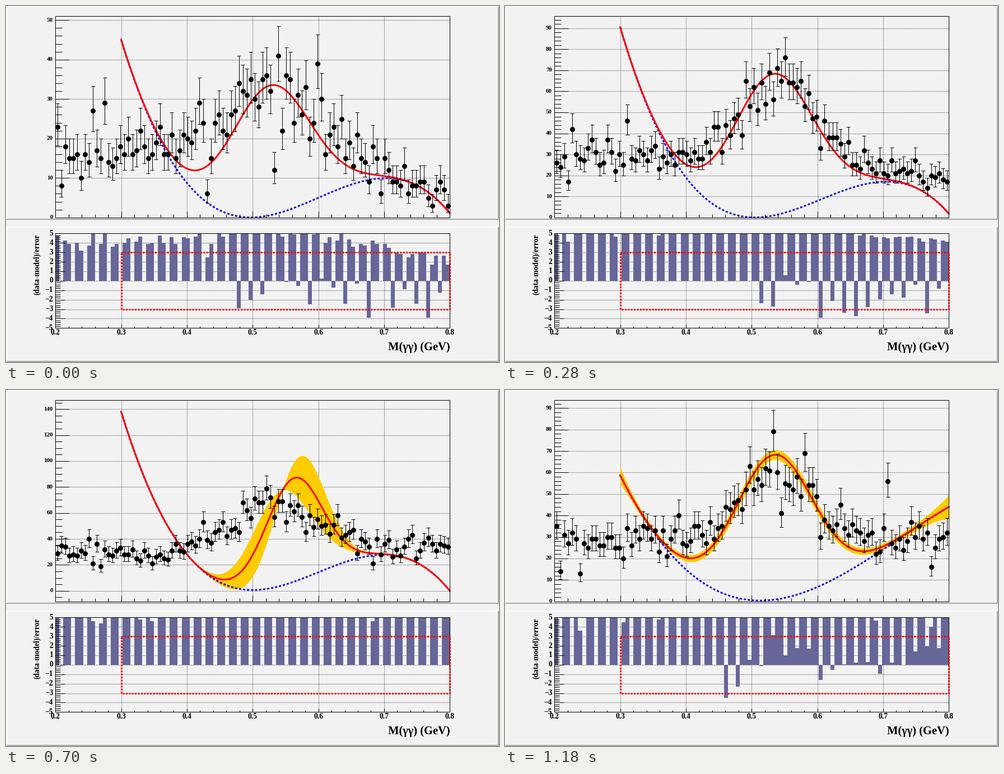
These frames come from a looping animation (880 by 636 pixels, 1.3 s). A matplotlib script:

```python
import matplotlib.pyplot as plt
import numpy as np
from matplotlib.animation import ArtistAnimation

W, H, DPI = 880, 636, 100
PX = 72 / DPI
plt.rcParams["font.family"] = "Liberation Serif"
plt.rcParams["font.weight"] = "bold"

LEFT, RIGHT = 88, 792
TOP, BOTTOM = 18, 378          # spectrum panel
PULL_TOP, PULL_BOTTOM = 406, 575
PULL_ZERO, PULL_UNIT = 490.6, 16.9
BINS = np.arange(100)
BIN = (RIGHT - LEFT) / 100
CENTERS = LEFT + BIN * (BINS + 0.5)
MASS = np.linspace(0.3, 0.8, 240)

fig = plt.figure(figsize=(W / DPI, H / DPI), dpi=DPI, facecolor="#f2f2f2")
ax = fig.add_axes([0, 0, 1, 1])
# the small shift keeps snapped lines on their own pixel
ax.set_xlim(-0.25, W - 0.25)
ax.set_ylim(H - 0.25, -0.25)
ax.axis("off")


def mass_px(m):
    return LEFT + (m - 0.2) * (RIGHT - LEFT) / 0.6


def hline(y, x0, x1, z=1, w=1, color="black", **kw):
    return ax.hlines(y, x0, x1, colors=color, lw=w * PX, zorder=z, **kw)


def vline(x, y0, y1, z=1, w=1, color="black", **kw):
    return ax.vlines(x, y0, y1, colors=color, lw=w * PX, zorder=z, **kw)


def label(x, y, s, size, ha="right", **kw):
    return ax.text(x, y, s, fontsize=size * PX, ha=ha, va="center", zorder=8, **kw)


DOTS = {"linestyles": [(0, (1, 2))]}


def draw_pad(y0, y1):
    """Bevelled pad edge."""
    for y, color in ((y0, "white"), (y1, "#a6a6a6")):
        hline(y, 0, W - 1, 0, 2, color)
    vline(0.5, y0, y1, 0, 2, "white")
    vline(W - 1, y0, y1, 0, 2, "#a6a6a6")


def draw_frame(y0, y1, major, minor):
    for y in (y0, y1):
        hline(y, LEFT, RIGHT, 4)
    for x in (LEFT, RIGHT):
        vline(x, y0, y1, 4)
    for k in range(31):
        x = mass_px(0.2 + 0.02 * k)
        vline(x, y1 - (minor if k % 5 else major), y1, 4)
        if k % 5 == 0 and 0 < k < 30:
            vline(x, y0, y1, 0.5, **DOTS)


def draw_static():
    draw_pad(0.5, 380.5)
    draw_pad(394.5, 634.5)
    draw_frame(TOP, BOTTOM, 11, 6)
    draw_frame(PULL_TOP, PULL_BOTTOM, 6, 3)
    for k in range(-25, 26):
        y = PULL_ZERO - PULL_UNIT * k / 5
        hline(y, LEFT, LEFT + (9 if k % 5 else 17), 4)
        if k % 5 == 0:
            label(84, y, str(k // 5).replace("-", "\u2212"), 13.5)
            if abs(k) < 25:
                hline(y, LEFT, RIGHT, 0.5, **DOTS)
    for k in range(2, 9):
        label(mass_px(k / 10), 583.5, f"0.{k}", 13.5, "center")
    label(RIGHT, 609.5, "M(\u03b3\u03b3) (GeV)", 20.5)
    label(55, 461, "(data-model)/error", 13.5, "center", rotation=90)
    box_x = mass_px(np.array([0.3, 0.8, 0.8, 0.3, 0.3]))
    box_y = PULL_ZERO - PULL_UNIT * np.array([3, 3, -3, -3, 3])
    ax.plot(box_x, box_y, color="red", lw=3 * PX, ls=(0, (1, 0.8)), zorder=5,
            dash_capstyle="butt")


def spectrum(seed, level, height, center, width, drop, standouts):
    """Noisy counts on a plateau with one bump; standouts are {bin: count}."""
    trend = (level + height * np.exp(-((BINS - center) / width) ** 2 / 2)
             - drop * (BINS / 99) ** 4)
    noise = np.random.default_rng(seed).normal(0, 0.8, 100)
    counts = np.maximum(np.round(trend + noise * np.sqrt(trend)), 3)
    for i, count in standouts.items():
        counts[i] = count
    return counts


def cubic(left, right, center, floor):
    """Cubic with its minimum at center, fixed at both ends of the fit range."""
    u0, u1 = 0.3 - center, 0.8 - center
    l, r = (left - floor) / u0**2, (right - floor) / u1**2
    slope = (r - l) / (u1 - u0)
    u = MASS - center
    return u**2 * (l + slope * (u - u0)) + floor


def pulls(counts, start, level, decay):
    """Every third bin is compared with a falling model, the rest with zero."""
    model = np.where(BINS % 3 == 1, level * np.exp(-decay * (BINS - start)), 0)
    return (counts - model) / np.sqrt(counts)


def scene(n, zero, unit, step, minor, bkg, peak, fall, band=None):
    """Build all artists of one fit; unit is pixels per count."""
    def to_y(v):
        return zero - unit * np.asarray(v)

    out = []
    low = int(np.ceil((zero - BOTTOM - 0.6) / unit / minor))
    high = int((zero - TOP) / unit / minor)
    for k in range(low, high + 1):
        value = k * minor
        y = to_y(value)
        major = value % step == 0
        out.append(hline(y, LEFT, LEFT + (25 if major else 12), 4))
        if major:
            out.append(label(83.5, y, str(value), 11))
            out.append(hline(y, LEFT, RIGHT, 0.5, **DOTS))

    x = mass_px(MASS)
    amp, mean, sigma = peak
    t = (MASS - mean) / sigma
    signal = amp * np.exp(-t**2 / 2)
    base = cubic(*bkg)
    fit = base + signal
    if band:
        err = band(t, signal)
        out.append(ax.fill_between(x, to_y(fit - err), to_y(fit + err),
                                   color="#ffcc00", lw=0, zorder=2))
    out += ax.plot(x, to_y(base), color="blue", lw=3 * PX, ls=(0, (1.3, 1.1)),
                   dash_capstyle="butt", zorder=3)
    out += ax.plot(x, to_y(fit), color="red", lw=3 * PX, zorder=3.5)

    # Poisson intervals
    top = to_y(n + np.sqrt(n + 0.75) + 1)
    bottom = to_y(n - np.sqrt(n - 0.25))
    out.append(vline(CENTERS, top, bottom, 6))
    for y in (top, bottom):
        out.append(hline(y, CENTERS - 3.5, CENTERS + 3.5, 6))
    out += ax.plot(CENTERS, to_y(n), "o", color="black", ms=9 * PX, mew=0, zorder=7)

    p = pulls(n, *fall)
    shown = p > -5
    out += ax.bar(CENTERS[shown], -PULL_UNIT * np.minimum(p[shown], 5), BIN,
                  bottom=PULL_ZERO, color="#666699", lw=0, zorder=2)
    return out


def shifted_band(t, signal):
    return np.hypot(signal * (0.155 + 0.33 * t - 0.13 * t**2), 0.6)


def flared_band(t, signal):
    ends = 2.8 * np.exp((0.3 - MASS) / 0.015) + 4.4 * np.exp((MASS - 0.8) / 0.025)
    return 1.2 + ends + signal * (0.014 + 0.02 * np.abs(t))


draw_static()
first = scene(
    spectrum(3, 16.5, 18, 56, 11, 11,
             {12: 29, 36: 29, 38: 6, 55: 12, 56: 41, 66: 39, 82: 6, 99: 3}),
    377.5, 7.05, 10, 2, (45, 1.06, 0.497, 0),
    (32.9, 0.527, 0.0605), (49, 47, 0.0273))
rest = [
    scene(
        spectrum(5, 30, 33, 56, 9.5, 11,
                 {3: 17, 4: 42, 18: 46, 48: 65, 54: 69, 62: 65, 67: 33, 86: 21}),
        377.5, 3.755, 10, 2, (90.5, 1.8, 0.505, 0),
        (67.4, 0.532, 0.0606), (52, 83, 0.0268)),
    scene(
        spectrum(7, 40, 43, 57, 9, 8,
                 {9: 51, 17: 25, 21: 52, 34: 61, 55: 95, 65: 68, 76: 60, 96: 25}),
        377.5, 2.357, 20, 5, (144, 11.9, 0.497, 0),
        (72.5, 0.533, 0.0612), (55, 123, 0.0292)),
    scene(
        spectrum(11, 29, 36, 55, 11, -6,
                 {8: 40, 11: 19, 37: 53, 47: 68, 53: 79, 63: 45, 71: 58, 80: 21}),
        358.5, 2.318, 20, 5, (138, 0, 0.5, 0.6),
        (79.8, 0.563, 0.0428), (49, 200, 0.01), shifted_band),
    scene(
        spectrum(13, 27, 30, 56, 10, -4,
                 {6: 13, 31: 40, 49: 63, 55: 79, 57: 41, 63: 69, 84: 56, 95: 16}),
        377.5, 3.839, 10, 2, (58.7, 44, 0.513, 0.4),
        (67.4, 0.534, 0.0598), (46, 62.8, 0.0229), flared_band),
]

# 100 ms for the first fit, 300 ms for each of the others
steps = [first] + [s for s in rest for _ in range(3)]
anim = ArtistAnimation(fig, steps, interval=100, repeat=True, repeat_delay=0)
plt.show()
```
